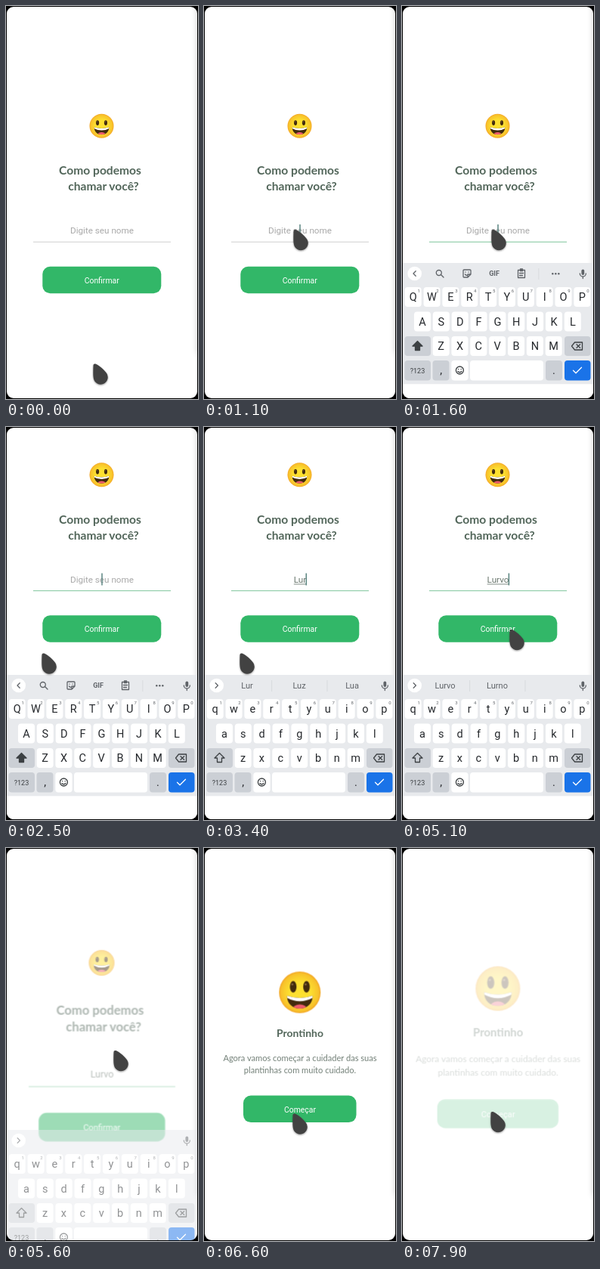
An HTML page that plays this animation: 254x520 px, repeating every 8000 ms.

```html
<!DOCTYPE html>
<html lang="pt-BR">
<head>
<meta charset="utf-8">
<title>Boas-vindas</title>
<style>
html, body { margin: 0; width: 100%; height: 100%; overflow: hidden; background: #000; }
svg { display: block; width: 100%; height: 100%; }
text { font-family: Roboto, Arial, sans-serif; text-anchor: middle; white-space: pre; }
.head { font-family: Lato, sans-serif; font-weight: 700; fill: #52665a; }
.body { font-family: Lato, sans-serif; font-size: 11.1px; fill: #738078; }
.label { font-size: 10.4px; fill: #fff; }
.field { font-size: 11.7px; }
.key { font-size: 14.5px; fill: #25282c; }
.small { font-size: 6px; fill: #62666b; }
.tip { font-size: 11px; fill: #5f6368; }
.icon { fill: none; stroke: #5f6368; stroke-width: 1.3; stroke-linecap: round; stroke-linejoin: round; }
</style>
</head>
<body>
<svg viewBox="0 0 254 520">
  <defs>
    <clipPath id="phone"><rect x="1" y="1" width="252" height="518" rx="9"/></clipPath>
    <radialGradient id="skin">
      <stop offset=".5" stop-color="#fde030"/>
      <stop offset=".9" stop-color="#f8c22b"/>
      <stop offset="1" stop-color="#f2a324"/>
    </radialGradient>
    <clipPath id="lips"><path d="M-62 14Q0 36 62 14C62 52 36 76 0 76S-62 52 -62 14Z"/></clipPath>
    <filter id="soft" x="-200%" width="500%"><feGaussianBlur stdDeviation="4"/></filter>
    <filter id="drop" x="-40%" y="-40%" width="180%" height="180%">
      <feDropShadow dx="0" dy="1" stdDeviation="1" flood-opacity=".4"/>
    </filter>
  </defs>
  <g clip-path="url(#phone)">
    <rect width="254" height="520" fill="#fff"/>
    <rect x="253" y="-20" width="14" height="480" opacity=".2" filter="url(#soft)"/>
    <g id="ask"></g>
    <g id="done"></g>
    <g id="board"></g>
    <path id="pointer" fill="#424242" filter="url(#drop)"
      d="M.5 3C.5.6 2 0 4 .8C9 3 15 8.5 18.2 13A9.5 9.5 0 1 1 .9 20C0 16 .3 9 .5 3Z"/>
  </g>
</svg>
<script>
const LOOP = 8000, STEP = 100, SHIFT = -95.5;
const $ = id => document.getElementById(id);

const text = (x, y, s, cls, extra = '') => `<text x="${x}" y="${y}" class="${cls}" ${extra}>${s}</text>`;
const box = (x, y, w, h, r, fill) =>
  `<rect x="${x}" y="${y}" width="${w}" height="${h}" rx="${r}" fill="${fill}"/>`;
const icon = (x, y, d, extra = '') =>
  `<path class="icon" transform="translate(${x} ${y})" d="${d}" ${extra}/>`;

function face(x, y, r, eyeX, eyeY, rx, ry, mouthY) {
  const eye = s => `<ellipse cx="${s * eyeX}" cy="${eyeY}" rx="${rx}" ry="${ry}" fill="#422b0d"/>
    <circle cx="${s * eyeX - 4}" cy="${eyeY - ry * .4}" r="${rx * .3}" fill="#8a6a48"/>`;
  return `<g transform="translate(${x} ${y}) scale(${r / 100})">
    <circle r="100" fill="url(#skin)"/>${eye(-1)}${eye(1)}
    <g clip-path="url(#lips)" transform="translate(0 ${mouthY})">
      <rect x="-70" width="140" height="90" fill="#422b0d"/>
      <ellipse cy="78" rx="34" ry="22" fill="#ed5b6c"/>
      <path d="M-70 6Q0 36 70 6V20Q0 62 -70 20Z" fill="#fff"/>
    </g></g>`;
}

// Screens
$('ask').innerHTML = face(126.5, 158.7, 16, 34, -26, 13, 21, -4) +
  text(124.5, 223, 'Como podemos', 'head', 'font-size="15.6"') +
  text(129, 244, 'chamar você?', 'head', 'font-size="15.6"') +
  '<text id="field" class="field" x="127" y="301"></text>' +
  '<rect id="compose" y="303" height=".9" fill="#738078"/>' +
  '<rect id="caret" y="289" width="1.4" height="16" fill="#4f7d78"/>' +
  '<rect id="line" x="36" y="311.7" width="182" height="1"/>' +
  `<g id="confirm">${box(48.3, 344.7, 157, 35.6, 10, '#32b768')}${text(126.7, 366.7, 'Confirmar', 'label')}</g>`;

$('done').innerHTML = face(126.8, 191, 27.5, 32, -27, 16, 28, 2) +
  text(127, 250, 'Prontinho', 'head', 'font-size="13.9"') +
  text(127, 282, 'Agora vamos começar a cuidader das suas', 'body') +
  text(127, 298, 'plantinhas com muito cuidado.', 'body') +
  `<g id="start">${box(52, 327.5, 149.5, 35.6, 10, '#32b768')}${text(127, 349.5, 'Começar', 'label')}</g>`;

// Keyboard, drawn from its own top edge
const GRAY = '#cbcfd5', PITCH = 24.85;
const mic = '<rect x="237.4" y="8.5" width="3.8" height="7.5" rx="1.9" fill="#5f6368"/>' +
  icon(239.3, 14, 'M-4 0A4 4 0 0 0 4 0M0 4V6.5');
const tools =
  icon(50, 14, 'M1.8 1.8L5 5M2.3 -1A3.5 3.5 0 1 1 -4.7 -1A3.5 3.5 0 1 1 2.3 -1') +
  icon(86, 14, 'M-4 -5H4Q5 -5 5 -4V1L1 5H-4Q-5 5 -5 4V-4Q-5 -5 -4 -5M1 5V1H5M-2 -2V-1.8M2 -2V-1.8M-2.5 1Q-1 3 .5 2') +
  text(122, 17.3, 'GIF', '', 'font-size="9" font-weight="700" fill="#5f6368"') +
  icon(158, 14, 'M-4.5 -4.5H4.5V5.5H-4.5ZM-1.5 -6H1.5V-3.5H-1.5ZM-2.5 -.5H2.5M-2.5 2.5H1.5') +
  box(180.5, 7, .8, 15, 0, '#d3d6da') +
  [-4, 0, 4].map(d => `<circle cx="${203.3 + d}" cy="14.3" r="1.2" fill="#5f6368"/>`).join('');

function row(letters, x, y, numbered) {
  return [...letters].map((c, i) => {
    const cx = x + i * PITCH;
    return box(cx - 11, y - 13, 22, 26, 4, '#fff') + text(cx, y + 5, c, 'key') +
      (numbered ? text(cx + 7.5, y - 6, (i + 1) % 10, 'small') : '');
  }).join('');
}

function keys(upper) {
  const cased = s => upper ? s : s.toLowerCase();
  return row(cased('QWERTYUIOP'), 14.7, 45, true) + row(cased('ASDFGHJKL'), 27, 77.5) +
    row(cased('ZXCVBNM'), 51.6, 110) +
    box(3.5, 97, 34.5, 26, 4, GRAY) + box(215, 97, 34.5, 26, 4, GRAY) +
    icon(20.5, 110, 'M0 -6.5L6.5 0H3V5.5H-3V0H-6.5Z', `style="fill:${upper ? '#3c4043' : 'none'};stroke:#3c4043"`) +
    icon(232, 110, 'M-7.5 0L-3.5 -5H6.5V5H-3.5ZM-1 -2.3L3.6 2.3M3.6 -2.3L-1 2.3', 'style="stroke:#3c4043"') +
    box(3.5, 129, 34.5, 26.5, 4, GRAY) + text(20.5, 145.5, '?123', '', 'font-size="9" fill="#3c4043"') +
    box(40.5, 129, 22, 26.5, 4, GRAY) + text(51.7, 146.5, ',', 'key') +
    box(65.3, 129, 22.3, 26.5, 4, '#fff') +
    icon(76.4, 142, 'M5 0A5 5 0 1 1 -5 0A5 5 0 1 1 5 0M-1.8 -1.5V-1.3M1.8 -1.5V-1.3M-2.5 1.5Q0 4 2.5 1.5', 'style="stroke:#3c4043"') +
    box(90, 129, 97, 26.5, 4, '#fff') +
    box(190, 129, 22, 26.5, 4, GRAY) + text(201, 146.5, '.', 'key') +
    box(215, 129, 34.5, 26.5, 4, '#1a73e8') + icon(232, 142, 'M-5.5 .3L-2 3.8L5.5 -3.7', 'style="stroke:#fff"');
}

$('board').innerHTML = box(0, 0, 254, 160.5, 0, '#e8eaed') + box(0, 160.5, 254, 60, 0, '#fff') +
  '<circle cx="16.7" cy="14" r="9.3" fill="#fff"/>' + icon(16.7, 14, 'M1.5 -3.2L-1.7 0L1.5 3.2', 'id="arrow"') + mic +
  `<g id="tools">${tools}</g><g id="caps">${keys(true)}</g><g id="lower">${keys(false)}</g><g id="tips">` +
  [57, 126, 196].map(x => text(x, 18, '', 'tip')).join('') +
  box(89.3, 7, .8, 15, 0, '#d3d6da') + box(162.6, 7, .8, 15, 0, '#d3d6da') + '</g>';

// Typed text with the suggestions it brings up
const typed = [
  [0, ''],
  [2900, 'L', 'L', 'Lá', 'Lua'],
  [3200, 'Lu', 'Lu', 'Lua', 'Luz'],
  [3400, 'Lur', 'Lur', 'Luz', 'Lua'],
  [3500, 'Lurv', 'Lurv', 'Lurvo', 'Luva'],
  [3600, 'Lurvo', 'Lurv', 'Lurvo', 'Luva'],
  [3800, 'Lurvo', 'Lurvo', 'Lurno', 'Luva'],
  [3900, 'Lurvo', 'Lurvo', 'Lurno', '']
];

// Motion as [time, value] points
const pointerX = [[0, 115], [500, 117], [600, 117], [700, 118], [2100, 118], [2500, 47], [4200, 47],
  [4300, 57], [5000, 142], [6100, 142], [6600, 117]];
const pointerY = [[0, 473], [500, 300], [600, 300], [700, 295.5], [2100, 295.5], [2500, 299], [4200, 299],
  [4300, 285.5], [5000, 267.5], [6100, 267.5], [6600, 351], [7000, 351], [7200, 348.5]];
const boardY = [[1300, 440], [1400, 400], [1500, 360], [1600, 340], [1700, 328], [5400, 328], [5500, 342], [5600, 373], [5700, 420]];
const boardAlpha = [[1300, 0], [1400, .4], [1500, 1], [5400, 1], [5600, .5], [5700, .15], [5800, 0]];
const askScale = [[5300, 1], [5400, 1.025], [5500, 1.053], [5600, 1.066], [5800, 1.075]];
const askAlpha = [[5300, 1], [5400, .9], [5600, .48], [5700, .15], [5800, 0]];
const doneScale = [[5600, .95], [5700, .975], [5800, .989], [6000, 1], [7700, 1], [7800, 1.05], [7900, 1.073]];
const doneAlpha = [[5600, 0], [5700, .25], [5800, .8], [5900, 1], [7700, 1], [7800, .65], [7900, .27]];

const smooth = u => u * u * (3 - 2 * u);
function at(points, t, ease = u => u) {
  if (t <= points[0][0]) return points[0][1];
  const i = points.findIndex(p => p[0] >= t);
  if (i < 0) return points[points.length - 1][1];
  const [t0, a] = points[i - 1], [t1, b] = points[i];
  return a + (b - a) * ease((t - t0) / (t1 - t0));
}
const within = (t, a, b) => t >= a && t < b;
const set = (id, values) => { for (const k in values) $(id).setAttribute(k, values[k]); };
const show = (id, on) => set(id, { visibility: on ? 'visible' : 'hidden' });
const zoom = s => `translate(127 260) scale(${s}) translate(-127 -260)`;

function draw(t) {
  const [, name, ...tips] = typed.filter(e => e[0] <= t).pop();
  const writing = name !== '';
  const raised = within(t, 1700, 5500);

  set('ask', { transform: zoom(at(askScale, t)) + ` translate(0 ${raised ? SHIFT : 0})`, opacity: at(askAlpha, t) });
  $('field').textContent = name || 'Digite seu nome';
  set('field', { fill: writing ? '#6b786f' : '#a9a9a9' });
  const width = writing ? $('field').getComputedTextLength() : 0;
  set('compose', { x: 127 - width / 2, width: t < 5300 ? width : 0 });
  set('caret', { x: 126.3 + width / 2 });
  show('caret', [[1100, 1700], [2200, 2700], [2900, 4300], [4800, 5300]].some(([a, b]) => within(t, a, b)));
  set('line', { fill: t < 1400 ? '#cfcfcf' : '#7cc49a' });
  set('confirm', { opacity: within(t, 5300, 5500) ? .7 : 1 });

  set('done', { transform: zoom(at(doneScale, t)), opacity: at(doneAlpha, t) });
  set('start', { opacity: t >= 7400 ? .7 : 1 });

  set('board', { transform: `translate(0 ${at(boardY, t)})`, opacity: at(boardAlpha, t) });
  $('board').style.display = within(t, 1400, 5800) ? '' : 'none';
  $('caps').style.display = $('tools').style.display = writing ? 'none' : '';
  $('lower').style.display = writing ? '' : 'none';
  $('tips').style.display = writing && t < 5400 ? '' : 'none';
  set('arrow', { d: writing ? 'M-1.5 -3.2L1.7 0L-1.5 3.2' : 'M1.5 -3.2L-1.7 0L1.5 3.2' });
  $('tips').querySelectorAll('text').forEach((el, i) => { el.textContent = tips[i] || ''; });

  set('pointer', { transform: `translate(${at(pointerX, t, smooth)} ${at(pointerY, t, smooth)})` });
}

const begin = performance.now();
function tick() {
  const t = (performance.now() - begin) % LOOP;
  draw(Math.floor(t / STEP) * STEP);
  requestAnimationFrame(tick);
}
tick();
</script>
</body>
</html>
```
